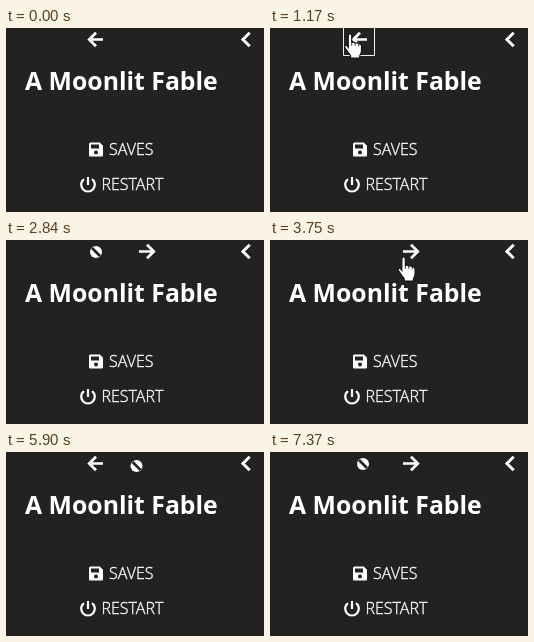
An HTML page for the animation above (8000 ms loop, 258x184 px).

```html
<!DOCTYPE html>
<html lang="en">
<head>
<meta charset="utf-8">
<title>Sidebar history buttons</title>
<style>
  html, body { margin: 0; height: 100%; overflow: hidden; background: #222; }
  svg { display: block; width: 258px; height: 184px; }
  text { font-family: "Open Sans", "Noto Sans", sans-serif; fill: #fff; }
  .title { font-size: 24.8px; font-weight: 700; }
  .item { font-size: 16px; font-weight: 300; stroke: #fff; stroke-width: .35; }
  .line { fill: none; stroke: #fff; stroke-width: 2.7; }
  .frame { fill: none; stroke: #eee; }
</style>
</head>
<body>
<svg viewBox="0 0 258 184">
  <g id="backIcon" class="line"><path d="M97 11.5H84M90 4.7l-6.8 6.8 6.8 6.8"/></g>
  <g id="nextIcon" class="line"><path d="M133 11.5h13M141 4.7l6.8 6.8-6.8 6.8"/></g>
  <path class="frame" id="backFrame" d="M73.5-.5v28h31v-28"/>
  <path class="frame" id="nextFrame" d="M125.5-.5v28h31v-28"/>
  <path class="line" style="stroke-width:3" d="M243.7 4.7l-6.8 6.8 6.8 6.8"/>

  <text class="title" x="19" y="62">A Moonlit Fable</text>

  <path fill="#fff" fill-rule="evenodd" d="M84.5 114.5h9.3l3.2 3.2v9.3q0 1.5-1.5 1.5h-11q-1.5 0-1.5-1.5v-11q0-1.5 1.5-1.5zM85 116.5v4h8v-4zM90 122.5a2 2 0 1 0 .01 0z"/>
  <text class="item" x="103" y="127">SAVES</text>
  <path class="line" style="stroke-width:2.2" d="M78 151.2a6.8 6.8 0 1 0 8 0M82 149v8"/>
  <text class="item" x="95.5" y="162">RESTART</text>

  <g id="cursor">
    <g id="hand" transform="scale(1.15)">
      <path fill="#fff" stroke="#111" d="M-1.5.5a1.5 1.5 0 0 1 3 0V6.5q2-.8 3 .5 2-.6 3 .8 2.5-.3 2.5 2.2v4q0 2-1.5 4v2h-8v-2q-2-2.5-5-7-.8-1.8.5-2.2 1-.2 2.5 2z"/>
      <path fill="none" stroke="#222" stroke-width=".7" d="M1.5 6.5v3M4.5 7v2.5M7.5 8v2"/>
    </g>
    <g id="banned">
      <circle r="6" fill="#fff"/>
      <path stroke="#222" stroke-width="2.6" d="M-4-4L4 4"/>
    </g>
    <path id="arrow" fill="#fff" stroke="#111" d="M0 0v16l3.7-3.5 2.5 5.8 2.4-1-2.5-5.7h5z"/>
  </g>
</svg>
<script>
  const LOOP = 8000, TICK = 69.3;
  const ENTER = 8;
  const CLICKS = [27, 68, 103];
  // Pointer path: tick, x, y
  const PATH = [
    [7, 210, 70], [12, 108, 24], [14, 108, 24], [17, 80, 7], [19, 84, 8],
    [37, 84, 8], [41, 90, 12], [43, 93, 13],
    [48, 93, 13], [54, 133.6, 18], [58, 138, 14],
    [84, 138, 14], [89, 100.6, 14], [93, 93, 12]
  ];
  const el = id => document.getElementById(id);
  const clamp = v => Math.max(0, Math.min(1, v));
  const show = (id, alpha) => el(id).setAttribute("opacity", alpha);
  const fade = (n, start) => clamp((n - start + 1) / 4);
  const hover = (n, start, end) => clamp((n - start) / 2) * (1 - fade(n, end));

  function pointAt(n) {
    const i = PATH.findIndex(p => p[0] > n);
    if (i === 0) return PATH[0].slice(1);
    if (i < 0) return PATH[PATH.length - 1].slice(1);
    const [a, x, y] = PATH[i - 1], [b, u, v] = PATH[i];
    const k = (n - a) / (b - a);
    return [x + (u - x) * k, y + (v - y) * k];
  }

  function draw(now) {
    const n = Math.floor((now % LOOP + 14) / TICK);
    const [first, second, third] = CLICKS;

    const next = fade(n, first) - fade(n, second) + fade(n, third);
    show("nextIcon", next);
    show("backIcon", 1 - next);
    show("backFrame", hover(n, 15, first) + hover(n, 89, third));
    show("nextFrame", hover(n, 54, second));

    const [x, y] = pointAt(n);
    const nextActive = CLICKS.filter(c => n >= c).length % 2 === 1;
    const inRow = y < 28;
    const onBack = inRow && x >= 73 && x <= 104;
    const onNext = inRow && x >= 125 && x <= 157;
    const kind = !onBack && !onNext ? "arrow" : onNext === nextActive ? "hand" : "banned";
    for (const id of ["hand", "banned", "arrow"]) show(id, id === kind ? 1 : 0);
    show("cursor", n < ENTER ? 0 : 1);
    el("cursor").setAttribute("transform", `translate(${x} ${y})`);
    requestAnimationFrame(draw);
  }
  requestAnimationFrame(draw);
</script>
</body>
</html>
```
